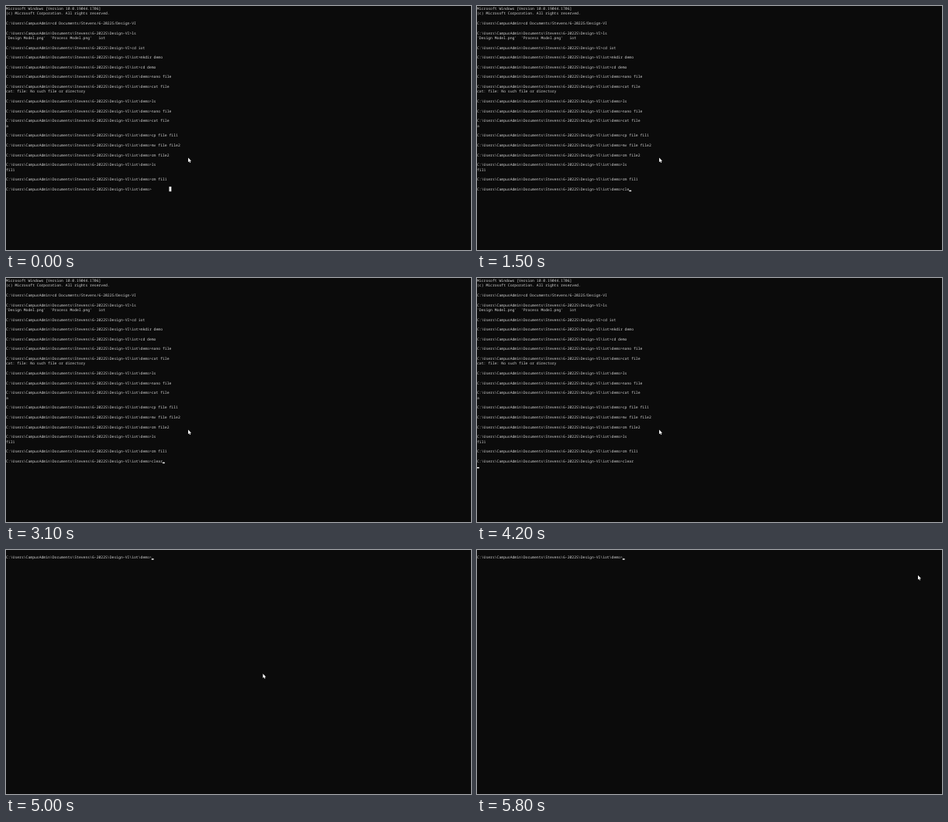
Write an HTML page that moves like this. It is 600x316 px and loops after 6 s.

```html
<!DOCTYPE html>
<html lang="en">
<head>
<meta charset="utf-8">
<title>Terminal</title>
<style>
  html, body { margin: 0; height: 100%; overflow: hidden; background: #0b0b0b; }
  svg { display: block; width: 100vw; height: 100vh; }
  text {
    font: 100px "Noto Sans Mono", "DejaVu Sans Mono", monospace;
    font-variant-ligatures: none;
    text-rendering: geometricPrecision;
    white-space: pre;
    fill: #d2d2d2;
  }
</style>
</head>
<body>
<svg viewBox="0 0 600 316">
  <g id="history"></g>
  <g id="prompt"></g>
  <rect id="block" x="210.5" y="233.9" width="2.85" height="6.3" fill="#f2f2f2"/>
  <rect id="caret" width="2.85" height="1.5" fill="#f2f2f2"/>
  <path id="pointer" d="M0 0V5.6L1.3 4.5L2.2 6.5L3.1 6.1L2.3 4.2H4Z" fill="#fff"/>
</svg>
<script>
const LOOP = 6000, CELL = 2.845, ROW = 6.32, BASELINE = 4.95;
const SCALE = CELL / 60; // the font advances 60 units per character
const $ = id => document.getElementById(id);

const home = String.raw`C:\Users\CampusAdmin`;
const design = home + String.raw`\Documents\Stevens\6-2022S\Design-VI`;
const iot = design + String.raw`\iot`;
const demo = iot + String.raw`\demo`;
const inDemo = command => `${demo}>${command}`;

const history = [
  [0, 'Microsoft Windows [Version 10.0.19044.1706]'],
  [1, '(c) Microsoft Corporation. All rights reserved.'],
  [3, `${home}>cd Documents/Stevens/6-2022S/Design-VI`],
  [5, `${design}>ls`],
  [6, "'Design Model.png'  'Process Model.png'   iot"],
  [8, `${design}>cd iot`],
  [10, `${iot}>mkdir demo`],
  [12, `${iot}>cd demo`],
  [14, inDemo('nano file')],
  [16, inDemo('cat file')],
  [17, 'cat: file: No such file or directory'],
  [19, inDemo('ls')],
  [21, inDemo('nano file')],
  [23, inDemo('cat file')],
  [24, 'a'],
  [26, inDemo('cp file fil1')],
  [28, inDemo('mv file file2')],
  [30, inDemo('rm file2')],
  [32, inDemo('ls')],
  [33, 'fil1'],
  [35, inDemo('rm fil1')]
];

function addLine(parent, row, string) {
  const line = document.createElementNS('http://www.w3.org/2000/svg', 'text');
  line.textContent = string;
  parent.append(line);
  moveLine(line, row);
  return line;
}

function moveLine(line, row) {
  line.setAttribute('transform', `translate(0 ${row * ROW + BASELINE}) scale(${SCALE})`);
}

for (const [row, string] of history) addLine($('history'), row, string);
const promptLine = addLine($('prompt'), 37, inDemo(''));

// Each step: start time, value held until the next step.
const typed = [[0, ''], [1200, 'c'], [1300, 'cl'], [1500, 'cle'], [1600, 'clea'], [1700, 'clear'], [4300, '']];
const promptRow = [[0, 37], [4300, null], [4400, 1]];
const caretOn = [
  [0, false], [400, true], [2100, false], [2700, true], [3200, false],
  [3700, true], [5100, false], [5600, true]
];
const caretHome = [[0, null], [4200, 38], [4300, 0], [4400, null]];
const pointerAt = [
  [0, [235.1, 196.6]], [5000, [331.5, 160.2]], [5100, [385, 87]], [5200, [414, 40]],
  [5300, [420, 32.6]], [5500, [481, 32.4]], [5600, [548, 32.4]], [5700, [571.5, 32.6]],
  [5800, [569, 32.8]]
];

const at = (steps, time) => steps.findLast(([start]) => start <= time)[1];
const show = (element, visible) => element.setAttribute('visibility', visible ? 'visible' : 'hidden');

function draw(time) {
  const row = at(promptRow, time);
  const command = at(typed, time);
  const homeRow = at(caretHome, time);
  const caretRow = homeRow ?? row;
  const column = homeRow === null ? inDemo(command).length : 0;

  show($('history'), time < 4300);
  show($('block'), time < 1200);
  show(promptLine, row !== null);
  if (row !== null) moveLine(promptLine, row);
  promptLine.textContent = inDemo(command);

  show($('caret'), at(caretOn, time));
  $('caret').setAttribute('x', column * CELL);
  $('caret').setAttribute('y', caretRow * ROW + 4.8);
  $('pointer').setAttribute('transform', `translate(${at(pointerAt, time)})`);
}

const started = performance.now();
function tick() {
  draw((performance.now() - started) % LOOP);
  requestAnimationFrame(tick);
}
tick();
</script>
</body>
</html>
```
